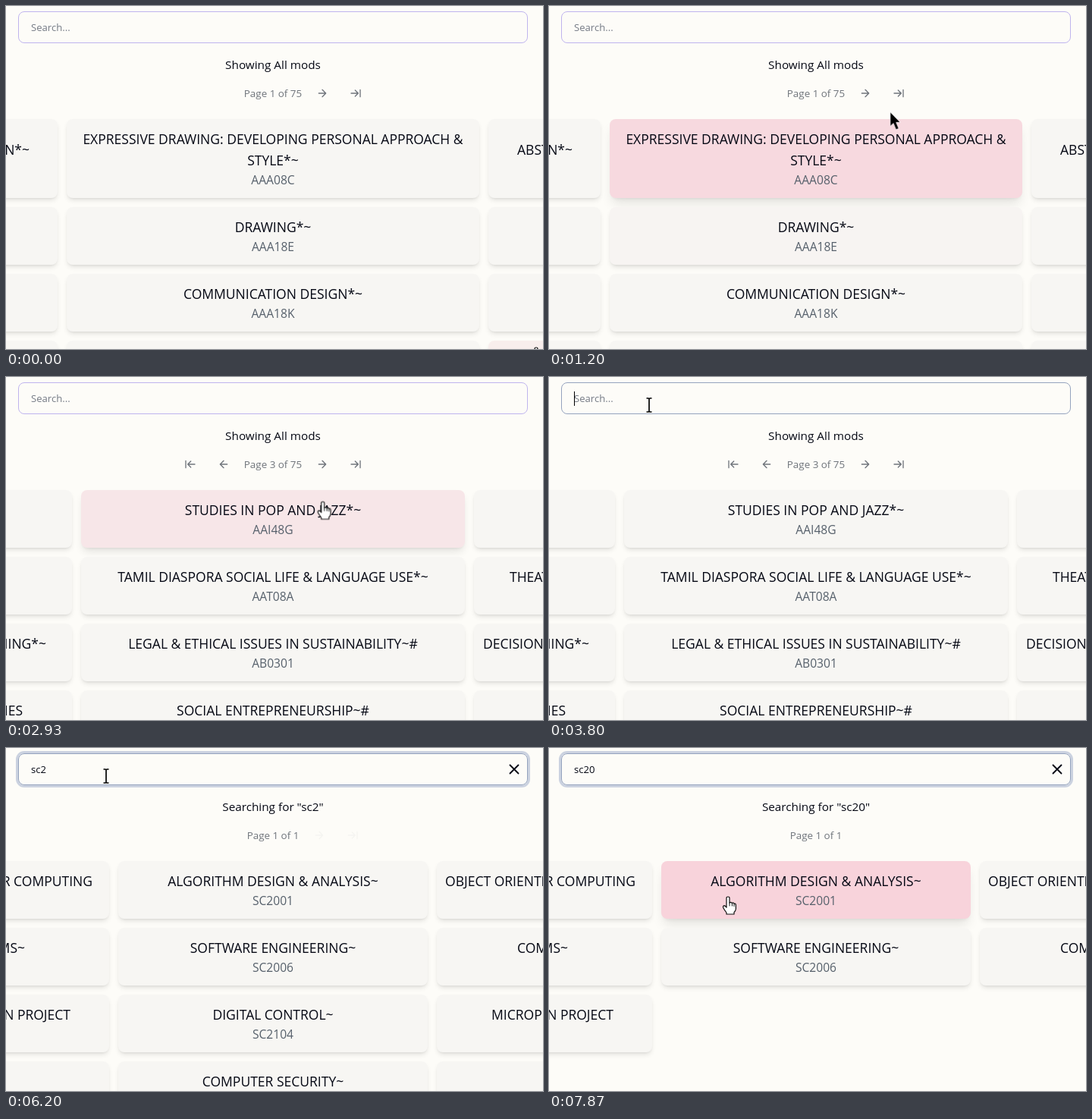
Recreate the animation shown at these times as an HTML page. Size 708 by 452 pixels, loop 8 s.

```html
<!DOCTYPE html>
<html lang="en">
<head>
<meta charset="utf-8">
<title>Module search</title>
<style>
  :root {
    --card: #f7f6f3;
    --pink: #f8d3db;
    --low: 0 4px 6px -1px rgba(0,0,0,.1), 0 2px 4px -2px rgba(0,0,0,.1);
    --high: 0 10px 15px -3px rgba(0,0,0,.1), 0 4px 6px -4px rgba(0,0,0,.1);
  }
  html, body { margin: 0; width: 100%; height: 100%; overflow: hidden; }
  body { position: relative; background: #fdfcf8; color: #050814; font-family: "Open Sans", "Noto Sans", sans-serif; }
  body * { box-sizing: border-box; }
  svg { display: block; fill: none; stroke: currentColor; stroke-width: 2; stroke-linecap: round; stroke-linejoin: round; }

  /* every animation shares one 8 s clock: 1% = 80 ms */
  .scene, .card, .back, .fwd, .box, .box *, .glow, .cursor, .cursor * {
    animation: 8s linear infinite;
  }

  /* search field */
  .box { position: absolute; left: 16px; top: 7px; width: 672px; height: 42px; border: 1px solid #bfb4ee; border-radius: 8px;
    animation-name: focus; animation-timing-function: step-end; }
  .line { position: absolute; left: 16px; top: 11px; height: 19px; display: flex; font-size: 13.1px; line-height: 19px; }
  .line i { font-style: normal; font-size: 0; animation-timing-function: step-end; }
  .hint { position: absolute; left: 0; color: #757b85; animation-name: hint; animation-timing-function: step-end; }
  .caret { width: 1px; height: 19px; background: #000; opacity: 0; animation-name: caret; animation-timing-function: step-end; }
  .clear { position: absolute; left: 642px; top: 9px; visibility: hidden; animation-name: clear; animation-timing-function: step-end; }
  @keyframes focus {
    47.2% { border-color: #95a3be; box-shadow: none; }
    48.1%, 100% { border-color: #95a3be; box-shadow: 0 0 0 3px #cbd2e0; }
  }
  @keyframes hint { 57.45% { visibility: hidden; } }
  @keyframes key1 { 57.45% { font-size: 13.1px; } }
  @keyframes key2 { 59.1% { font-size: 13.1px; } }
  @keyframes key3 { 69.95% { font-size: 13.1px; } }
  @keyframes key4 { 80.85% { font-size: 13.1px; } }
  @keyframes clear { 64.95% { visibility: visible; } }
  @keyframes caret {
    47.2% { opacity: 1; } 54.1% { opacity: 0; }
    57.45% { opacity: 1; } 65.8% { opacity: 0; }
    69.95% { opacity: 1; } 76.6% { opacity: 0; }
    80.85% { opacity: 1; } 92.5% { opacity: 0; }
  }

  /* result pages */
  .scene { position: absolute; inset: 0; visibility: hidden; animation-timing-function: step-end; }
  .head { position: absolute; left: 0; top: 65px; width: 704px; text-align: center; font-size: 15.3px; line-height: 24px; }
  .pager { position: absolute; left: 0; top: 97px; width: 704px; height: 36px; display: flex; gap: 8px;
    justify-content: center; align-items: center; font-size: 13.4px; line-height: 20px; color: #6f747b; }
  .pager span { margin: 0 1px; }
  .pager b { width: 36px; height: 36px; padding: 10px; }
  .glow { position: absolute; left: 400px; top: 97px; width: 36px; height: 36px; border-radius: 6px; background: #f1f2f4; opacity: 0; animation-name: glow; }
  .card { position: absolute; padding: 12px; border-radius: 8px; background: var(--card); box-shadow: var(--low);
    display: flex; flex-direction: column; justify-content: center; text-align: center; }
  .title { font-size: 17.5px; line-height: 28px; }
  .code { font-size: 15.6px; line-height: 24px; color: #56606b; min-height: 24px; }
  .side { white-space: pre; }

  #p1 { animation-name: p1; }
  #p2 { animation-name: p2; }
  #p3 { animation-name: p3; }
  #s1 { animation-name: s1; }
  #s2 { animation-name: s2; }
  #s3 { animation-name: s3; }
  @keyframes p1 { 0% { visibility: visible; } 22.45% { visibility: hidden; } }
  @keyframes p2 { 22.45% { visibility: visible; } 31.6% { visibility: hidden; } }
  @keyframes p3 { 31.6% { visibility: visible; } 64.95% { visibility: hidden; } }
  @keyframes s1 { 64.95% { visibility: visible; } 75.85% { visibility: hidden; } }
  @keyframes s2 { 75.85% { visibility: visible; } 86.7% { visibility: hidden; } }
  @keyframes s3 { 86.7%, 100% { visibility: visible; } }

  #p1 .back, #s2 .back, #s3 .back, #s3 .fwd { opacity: 0; }
  #p2 .back { animation-name: backIn; }
  #s1 .back { animation-name: backOut; }
  #s2 .fwd { animation-name: fwdOut; }
  @keyframes backIn { 0%, 22.4% { opacity: 0; } 24.2%, 100% { opacity: 1; } }
  @keyframes backOut { 0%, 65% { opacity: 1; } 66.8%, 100% { opacity: 0; } }
  @keyframes fwdOut { 0%, 75.9% { opacity: 1; } 77.6%, 100% { opacity: 0; } }
  @keyframes glow { 0%, 17% { opacity: 0; } 18.8%, 32.6% { opacity: 1; } 34.4%, 100% { opacity: 0; } }

  /* hovered cards */
  #p1r3 { animation-name: p1r3; animation-timing-function: step-end; }
  #p1r2 { animation-name: p1r2; }
  #p1c1 { animation-name: p1c1; }
  #p1c0 { animation-name: p1c0; }
  #p3c0 { animation-name: p3c0; }
  #s3c0 { animation-name: s3c0; }
  @keyframes p1r3 { 0% { background: #f8eeec; } .85% { background: var(--card); } }
  @keyframes p1r2 {
    0%, 6% { background: var(--card); box-shadow: var(--low); }
    8.6% { background: #f7dee2; box-shadow: var(--high); }
    12.4%, 100% { background: var(--card); box-shadow: var(--low); }
  }
  @keyframes p1c1 {
    0%, 9.4% { background: var(--card); box-shadow: var(--low); }
    11.4% { background: #f7e1e4; box-shadow: var(--high); }
    15.3%, 100% { background: var(--card); box-shadow: var(--low); }
  }
  @keyframes p1c0 {
    0%, 11.3% { background: var(--card); box-shadow: var(--low); }
    14.7% { background: var(--pink); box-shadow: var(--high); }
    15% { background: #f7d9df; box-shadow: var(--high); }
    18.9%, 100% { background: var(--card); box-shadow: var(--low); }
  }
  @keyframes p3c0 {
    0%, 34.9% { background: var(--card); box-shadow: var(--low); }
    38.6%, 42.6% { background: var(--pink); box-shadow: var(--high); }
    46.4%, 100% { background: var(--card); box-shadow: var(--low); }
  }
  @keyframes s3c0 {
    0%, 91.5% { background: var(--card); box-shadow: var(--low); }
    95.3%, 100% { background: var(--pink); box-shadow: var(--high); }
  }

  /* pointer */
  .cursor { position: absolute; left: 0; top: 0; animation-name: move; }
  .cursor svg { position: absolute; overflow: visible; width: 1px; height: 1px; visibility: hidden; animation-timing-function: step-end; }
  .cursor .arrow { animation-name: arrow; }
  .cursor .hand { animation-name: hand; }
  .cursor .beam { animation-name: beam; }
  @keyframes move {
    0%, .85% { transform: translate(699px, 450px); }
    .86%, 4.8% { transform: translate(694px, 462px); }
    7.5% { transform: translate(660px, 400px); }
    9.4% { transform: translate(618px, 340px); }
    11.3% { transform: translate(550px, 264px); }
    14.2% { transform: translate(465px, 160px); }
    15% { transform: translate(450px, 140px); }
    16.7% { transform: translate(431px, 123px); }
    18.8%, 32.4% { transform: translate(420px, 115px); }
    34.9% { transform: translate(420px, 149px); }
    36.6% { transform: translate(418px, 164px); }
    39.1% { transform: translate(394px, 186px); }
    41.6% { transform: translate(344px, 186px); }
    43.8% { transform: translate(240px, 126px); }
    45.9% { transform: translate(150px, 58px); }
    47.4%, 81.6% { transform: translate(132px, 37px); }
    84.8% { transform: translate(146px, 56px); }
    89.1% { transform: translate(186px, 115px); }
    91.5% { transform: translate(205px, 149px); }
    95% { transform: translate(230px, 189px); }
    97.5%, 100% { transform: translate(236px, 196px); }
  }
  @keyframes arrow {
    14.7% { visibility: visible; } 17% { visibility: hidden; }
    33.6% { visibility: visible; } 34.9% { visibility: hidden; }
    42.7% { visibility: visible; } 46.3% { visibility: hidden; }
    84% { visibility: visible; } 91.5% { visibility: hidden; }
  }
  @keyframes hand {
    0% { visibility: visible; } 14.7% { visibility: hidden; }
    17% { visibility: visible; } 33.6% { visibility: hidden; }
    34.9% { visibility: visible; } 42.7% { visibility: hidden; }
    91.5%, 100% { visibility: visible; }
  }
  @keyframes beam { 46.3% { visibility: visible; } 84% { visibility: hidden; } }
</style>
</head>
<body>
<div class="glow"></div>
<div id="pages"></div>

<div class="box">
  <div class="line">
    <span class="hint">Search...</span>
    <i style="animation-name:key1">s</i><i style="animation-name:key2">c</i><i style="animation-name:key3">2</i><i style="animation-name:key4">0</i>
    <span class="caret"></span>
  </div>
  <svg class="clear" width="22" height="22" viewBox="0 0 24 24"><path d="M18 6 6 18M6 6l12 12"/></svg>
</div>

<div class="cursor">
  <svg class="arrow"><path d="M0 0V18.5L4.2 14.7 7.6 23 11.2 21.5 7.8 13.5H13Z" fill="#000" stroke="#fff" stroke-width=".7"/></svg>
  <svg class="hand"><path d="M-2 2Q-2 0 0 0T2 2V8Q4 6.5 5.4 8.6 7.3 7 8 9.4 10.2 8.2 10.4 11V16Q10 19 8 20.5V23H-2V21Q-5 17-6.3 14.5-7 12-5 11.7-3.5 12-2 14.2Z" fill="#fff" stroke="#111" stroke-width="1.2"/><path d="M2 8V12M5.4 9V12M8 10V12.5" stroke="#111" stroke-width="1"/></svg>
  <svg class="beam"><path d="M-3.5-9H-1L0-8 1-9H3.5M0-8V8M-3.5 9H-1L0 8 1 9H3.5" stroke="#000" stroke-width="1.7" stroke-linecap="butt"/></svg>
</div>

<script>
const MID = 352, GAP = 12, TOP = 149;
const ALL = "Showing All mods";
const found = q => `Searching for "${q}"`;

const icons = {
  first: "M3 19V5M13 6l-6 6 6 6M7 12h14",
  prev: "M12 19l-7-7 7-7M19 12H5",
  next: "M5 12h14M12 5l7 7-7 7",
  last: "M17 12H3M11 18l6-6-6-6M21 5v14"
};
const button = (name, cls) =>
  `<b class="${cls}"><svg width="16" height="16" viewBox="0 0 24 24"><path d="${icons[name]}"/></svg></b>`;

const card = (id, x, y, w, h, body) =>
  `<div class="card" id="${id}" style="left:${x}px;top:${y}px;width:${w}px;height:${h}px">${body}</div>`;

// Side titles are given by the x where they leave (left) or enter (right) the view.
const side = (text, align, pad) =>
  `<div class="title side" style="text-align:${align};margin:0 -12px;padding-${align}:${pad}px">${text}</div><div class="code"></div>`;

// row: [height, title, code, [left text, end x], [right text, start x]]
function scene(id, w, head, page, rows) {
  const x = MID - w / 2, left = x - GAP, right = x + w + GAP;
  let y = TOP, html = "";
  rows.forEach(([h, title, code, l, r], i) => {
    if (l) html += card(`${id}l${i}`, left - w, y, w, h, side(l[0], "right", left - l[1]));
    if (title) html += card(`${id}c${i}`, x, y, w, h, `<div class="title">${title}</div><div class="code">${code}</div>`);
    if (r) html += card(`${id}r${i}`, right, y, w, h, side(r[0], "left", r[1] - right));
    y += h + GAP;
  });
  return `<div class="scene" id="${id}"><div class="head">${head}</div><div class="pager">` +
    button("first", "back") + button("prev", "back") + `<span>Page ${page}</span>` +
    button("next", "fwd") + button("last", "fwd") + `</div>${html}</div>`;
}

const none = ["", 0], blank = ["", 708];
const core = [
  [76, "ALGORITHM DESIGN &amp; ANALYSIS~", "SC2001", ["FOR COMPUTING", 114], ["OBJECT ORIENTED DESIGN", 579]],
  [76, "SOFTWARE ENGINEERING~", "SC2006", ["SYSTEMS~", 25], ["COMPUTER NETWORK", 674]]
];
const project = ["DESIGN PROJECT", 85];

document.getElementById("pages").innerHTML =
  scene("p1", 544, ALL, "1 of 75", [
    [104, "EXPRESSIVE DRAWING: DEVELOPING PERSONAL APPROACH &amp; STYLE*~", "AAA08C", ["DESIGN*~", 31], ["ABSTRACT", 674]],
    [76, "DRAWING*~", "AAA18E", none, blank],
    [76, "COMMUNICATION DESIGN*~", "AAA18K", none, blank],
    [76, "&nbsp;", "", none, blank]
  ]) +
  scene("p2", 544, ALL, "2 of 75", [
    [76, "PAINTING: COLOUR &amp; COMPOSITION*~", "AAA28B", none, blank],
    [76, "MUSIC &amp; MOVEMENT*~", "AAI18B", none, blank],
    [76, "VOICE &amp; CHORAL PRACTICE*~", "AAI28C", none, blank],
    [76, "KEYBOARD SKILLS*~", "AAI28F", none, blank]
  ]) +
  scene("p3", 506, ALL, "3 of 75", [
    [76, "STUDIES IN POP AND JAZZ*~", "AAI48G", none, blank],
    [76, "TAMIL DIASPORA SOCIAL LIFE &amp; LANGUAGE USE*~", "AAT08A", none, ["THEATRE", 664]],
    [76, "LEGAL &amp; ETHICAL ISSUES IN SUSTAINABILITY~#", "AB0301", ["TEACHING*~", 53], ["DECISION MAKING", 629]],
    [76, "SOCIAL ENTREPRENEURSHIP~#", "AB0302", ["STUDIES", 22], blank]
  ]) +
  scene("s1", 544, found("sc"), "1 of 7", [
    [104, "SCULPTURE*~", "AAA18R", none, ["GENDER\n ", 665]],
    [76, "INTRODUCTION TO DATA SCIENCE", "BS0004", none, ["SMART", 676]],
    [104, "SCIENCE &amp; TECHNOLOGY FOR HUMANITY", "CC0007", ["CONTEMPORARY\n ", 26], blank]
  ]) +
  scene("s2", 408, found("sc2"), "1 of 1", [
    ...core,
    [76, "DIGITAL CONTROL~", "SC2104", project, ["MICROPROCESSORS", 640]],
    [76, "COMPUTER SECURITY~", "SC2203", none, blank]
  ]) +
  scene("s3", 408, found("sc20"), "1 of 1", [...core, [76, "", "", project, null]]);
</script>
</body>
</html>
```
